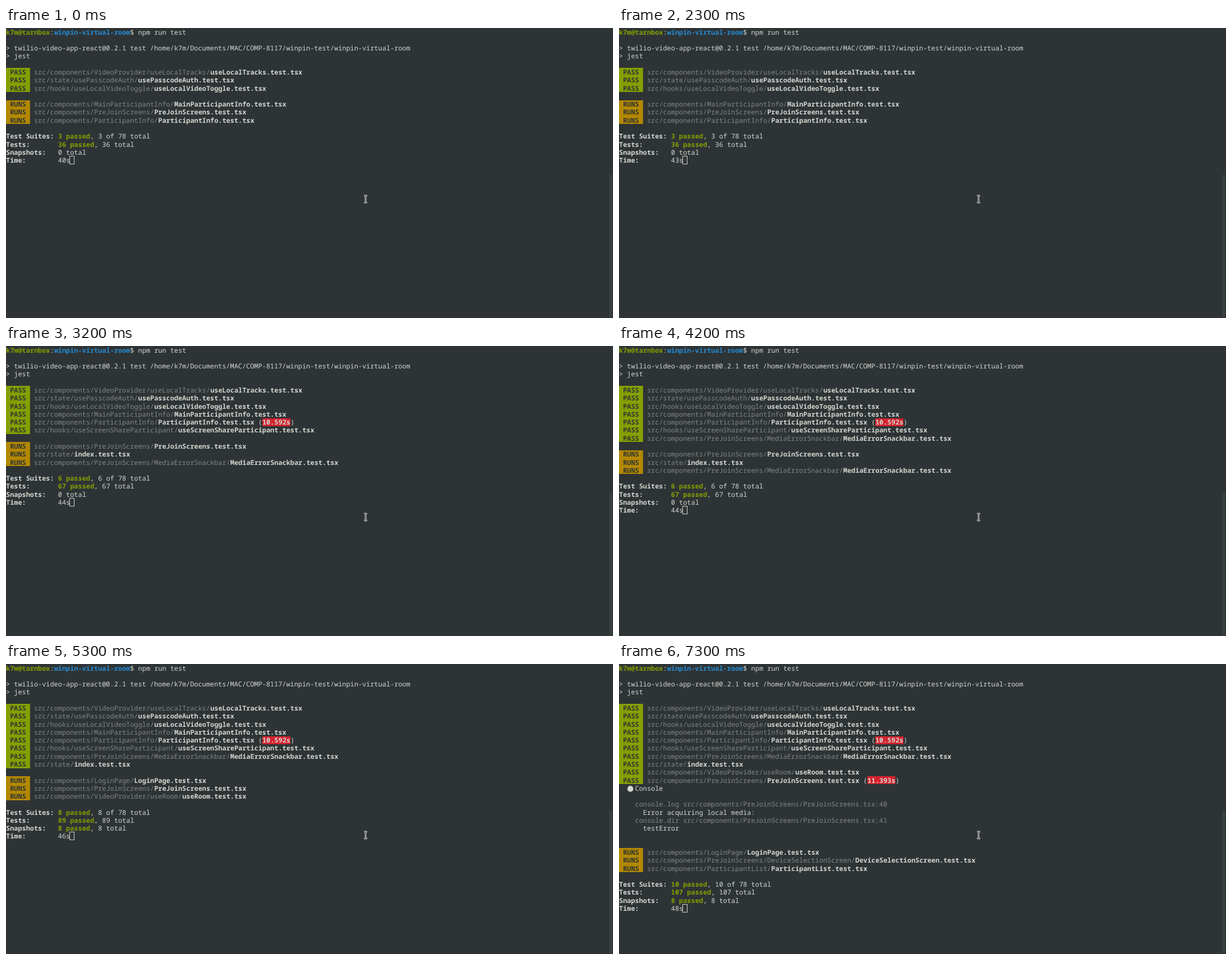
These frames come from a looping animation (1082x517 px, 8 s). An HTML page with a canvas:

```html
<!DOCTYPE html>
<html lang="en">
<head>
<meta charset="utf-8">
<title>Test run</title>
<style>
html, body { margin: 0; width: 100%; height: 100%; overflow: hidden; background: #2e3436; }
canvas { display: block; }
</style>
</head>
<body>
<canvas id="term" width="1082" height="517"></canvas>
<script>
const ctx = document.getElementById('term').getContext('2d');
const LOOP = 8000;
const COL = 7.14, ROW = 14.28, BASE = 11.6;
const FONT = '11.9px "Noto Sans Mono", "DejaVu Sans Mono", monospace';
const BG = '#2e3436', FG = '#d3d7cf', DIM = '#828681';
const GREEN = '#859f00', YELLOW = '#b38800', BLUE = '#268bd2', RED = '#d3222e';

const FILES = {
  tracks: 'src/components/VideoProvider/useLocalTracks/useLocalTracks.test.tsx',
  auth: 'src/state/usePasscodeAuth/usePasscodeAuth.test.tsx',
  toggle: 'src/hooks/useLocalVideoToggle/useLocalVideoToggle.test.tsx',
  main: 'src/components/MainParticipantInfo/MainParticipantInfo.test.tsx',
  info: 'src/components/ParticipantInfo/ParticipantInfo.test.tsx',
  share: 'src/hooks/useScreenShareParticipant/useScreenShareParticipant.test.tsx',
  media: 'src/components/PreJoinScreens/MediaErrorSnackbar/MediaErrorSnackbar.test.tsx',
  index: 'src/state/index.test.tsx',
  room: 'src/components/VideoProvider/useRoom/useRoom.test.tsx',
  prejoin: 'src/components/PreJoinScreens/PreJoinScreens.test.tsx',
  login: 'src/components/LoginPage/LoginPage.test.tsx',
  device: 'src/components/PreJoinScreens/DeviceSelectionScreen/DeviceSelectionScreen.test.tsx',
  list: 'src/components/ParticipantList/ParticipantList.test.tsx'
};
const PASSED = ['tracks', 'auth', 'toggle', 'main', 'info', 'share', 'media', 'index', 'room', 'prejoin'];
const SLOW = { info: '10.592s', prejoin: '11.393s' };

// Each step changes only the listed fields of the running report.
const STEPS = [
  { at: 0, rows: 3, runs: 'main prejoin info', suites: 3, tests: 36, snaps: 0, sec: 40 },
  { at: 300, sec: 41 },
  { at: 1300, sec: 42 },
  { at: 2300, sec: 43 },
  { at: 2400, rows: 4 },
  { at: 2500, rows: 5, runs: 'prejoin share media', suites: 5, tests: 58 },
  { at: 3200, rows: 6, runs: 'prejoin index media', suites: 6, tests: 67, sec: 44 },
  { at: 4200, rows: 7 },
  { at: 4400, rows: 8, runs: 'login prejoin index', suites: 7, tests: 75, snaps: 8, sec: 45 },
  { at: 5000, runs: 'login prejoin room', suites: 8, tests: 89 },
  { at: 5300, sec: 46 },
  { at: 5500, rows: 9 },
  { at: 5600, runs: 'login prejoin device', suites: 9, tests: 99 },
  { at: 6300, sec: 47 },
  { at: 7100, rows: 10, runs: 'login device list', suites: 10, tests: 107 },
  { at: 7300, sec: 48 }
];

function stateAt(t) {
  return Object.assign({}, ...STEPS.filter(s => s.at <= t));
}

// Writes text on the character grid and returns the column after it.
function put(text, col, row, color = FG, bold = false) {
  ctx.font = (bold ? 'bold ' : '') + FONT;
  ctx.fillStyle = color;
  ctx.fillText(text, col * COL, row * ROW + BASE);
  return col + text.length;
}

function block(col, row, cols, color) {
  ctx.fillStyle = color;
  const y = Math.round(row * ROW);
  ctx.fillRect(col * COL, y, cols * COL, Math.round((row + 1) * ROW) - y);
}

function fileLine(tag, color, key, row) {
  block(0, row, 6, color);
  put(tag, 1, row, BG, true);
  const path = FILES[key], cut = path.lastIndexOf('/') + 1;
  let col = put(path.slice(0, cut), 7, row, DIM);
  return put(path.slice(cut), col, row, FG, true);
}

function passLine(key, row) {
  let col = fileLine('PASS', GREEN, key, row);
  const time = SLOW[key];
  if (!time) return;
  col = put('(', col + 1, row);
  block(col, row, time.length, RED);
  put(')', put(time, col, row, FG, true), row);
}

function consoleLog(row) {
  ctx.fillStyle = FG;
  ctx.beginPath();
  ctx.arc(20.2, row * ROW + 8.2, 5.3, 0, Math.PI * 2);
  ctx.fill();
  put('Console', 4, row);
  put('console.log src/components/PreJoinScreens/PreJoinScreens.tsx:40', 4, row + 2, DIM);
  put('Error acquiring local media:', 6, row + 3);
  put('console.dir src/components/PreJoinScreens/PreJoinScreens.tsx:41', 4, row + 4, DIM);
  put('testError', 6, row + 5);
}

function summary(label, row, passed, rest) {
  put(label, 0, row, FG, true);
  let col = 13;
  if (passed) {
    col = put(passed + ' passed', col, row, GREEN, true);
    col = put(', ', col, row);
  }
  return put(rest, col, row);
}

function header() {
  let col = put('k7m@tarnbox', 0, 0, GREEN, true);
  col = put(':', col, 0);
  col = put('winpin-virtual-room', col, 0, BLUE, true);
  put('$ npm run test', col, 0);
  put('> twilio-video-app-react@0.2.1 test /home/k7m/Documents/MAC/COMP-8117/winpin-test/winpin-virtual-room', 0, 2);
  put('> jest', 0, 3);
}

function pointer(x, y) {
  const beam = new Path2D(`M${x - 3} ${y - 6}h2l1 1l1 -1h2M${x} ${y - 5}v10M${x - 3} ${y + 6}h2l1 -1l1 1h2`);
  ctx.strokeStyle = '#f2f2f2';
  ctx.lineWidth = 2.6;
  ctx.stroke(beam);
  ctx.strokeStyle = '#22282a';
  ctx.lineWidth = 0.9;
  ctx.stroke(beam);
}

function scrollbar() {
  ctx.fillStyle = '#394042';
  ctx.beginPath();
  ctx.roundRect(1075.5, 261, 5, 255, 2.5);
  ctx.fill();
}

function draw(t) {
  const s = stateAt(t);
  ctx.fillStyle = BG;
  ctx.fillRect(0, 0, 1082, 517);
  header();

  let row = 5;
  for (const key of PASSED.slice(0, s.rows)) passLine(key, row++);
  if (s.rows === PASSED.length) {
    consoleLog(row);
    row += 7;
  }
  row++;
  for (const key of s.runs.split(' ')) fileLine('RUNS', YELLOW, key, row++);
  row++;

  summary('Test Suites:', row++, s.suites, s.suites + ' of 78 total');
  summary('Tests:', row++, s.tests, s.tests + ' total');
  summary('Snapshots:', row++, s.snaps, s.snaps + ' total');
  const col = summary('Time:', row, 0, s.sec + 's');

  ctx.strokeStyle = FG;
  ctx.lineWidth = 1;
  ctx.strokeRect(Math.floor(col * COL) - 0.5, Math.floor(row * ROW) + 0.5, 8, 14);

  scrollbar();
  pointer(641, 305);
}

ctx.textRendering = 'geometricPrecision';
const start = performance.now();
function tick() {
  draw((performance.now() - start) % LOOP);
  requestAnimationFrame(tick);
}
tick();
</script>
</body>
</html>
```
